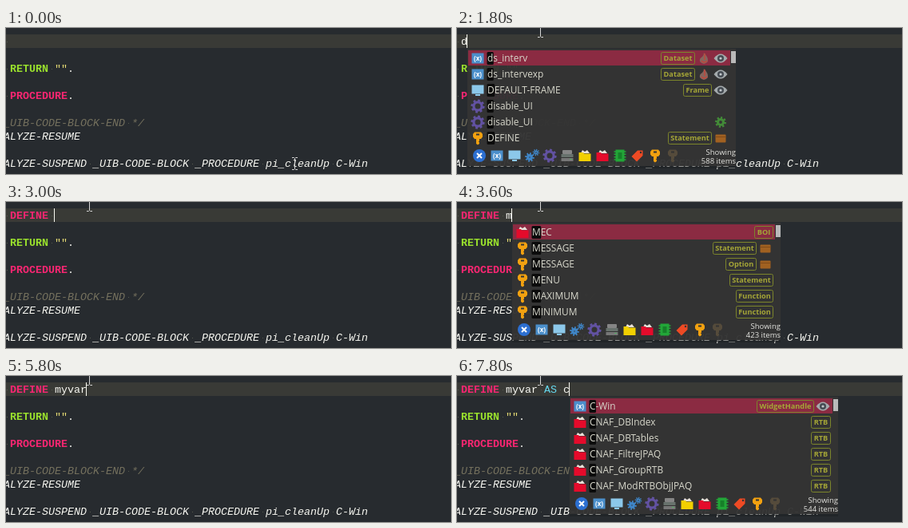
An HTML page for the animation above (8000 ms loop, 557 by 183 pixels).

```html
<!DOCTYPE html>
<html lang="en">
<head>
<meta charset="utf-8">
<title>Code completion</title>
<style>
  html, body { margin: 0; width: 100%; height: 100%; overflow: hidden; background: #272b2f; }
  svg { display: block; width: 557px; height: 183px; }
  text { white-space: pre; }
  .code { font: 13.333px "Liberation Mono", monospace; fill: #f8f8f2; }
  .key { fill: #f92672; font-weight: bold; }
  .ret { fill: #9be22d; font-weight: bold; }
  .str { fill: #e6db74; }
  .abbr { fill: #f0622d; }
  .as { fill: #66d9ef; }
  .note { fill: #75715e; font-style: italic; }
  .pre { font-style: italic; }
  .item { font: 11.9px "Open Sans", "Noto Sans", sans-serif; fill: #d8d8cc; }
  .badge { font: bold 9.2px "Open Sans", "Noto Sans", sans-serif; fill: #a5a637; text-anchor: middle; }
  .count { font: 9.5px "Open Sans", "Noto Sans", sans-serif; fill: #e4e4e0; text-anchor: end; }
  .glyph { font: bold 8px "Open Sans", sans-serif; fill: #fff; text-anchor: middle; }
</style>
</head>
<body>
<svg viewBox="0 0 557 183">
  <rect width="557" height="183" fill="#272b2f"/>
  <rect y="8" width="557" height="17" fill="#393a36"/>
  <g id="page"></g>
  <g id="typed"></g>
  <g id="popup"></g>
  <g id="mouse" fill="none" stroke="#d6d6d6">
    <path d="M-3.5-7.5H-1L0-6.5L1-7.5H3.5M0-6.5V6.5M-3.5 7.5H-1L0 6.5L1 7.5H3.5"/>
  </g>
</svg>
<script>
const LOOP = 8000, CHAR = 8, LEFT = 5, WIDTH = 336;
const $ = id => document.getElementById(id);
const pen = document.createElement('canvas').getContext('2d');
const measure = (s, font) => { pen.font = font; return pen.measureText(s).width; };
const ITEM_FONT = '11.9px "Open Sans", "Noto Sans", sans-serif';
const BADGE_FONT = 'bold 9.2px "Open Sans", "Noto Sans", sans-serif';

const rect = (x, y, w, h, fill, extra = '') =>
  `<rect x="${x}" y="${y}" width="${w}" height="${h}" fill="${fill}" ${extra}/>`;
const circle = (r, fill, extra = '') => `<circle r="${r}" fill="${fill}" ${extra}/>`;
const path = (d, fill, extra = '') => `<path d="${d}" fill="${fill}" ${extra}/>`;
const label = (x, y, cls, s) => `<text x="${x}" y="${y}" class="${cls}">${s}</text>`;

// One editor line made of [text, class] runs, with a faint dot on each blank.
function line(row, x, runs) {
  let out = '';
  for (const [s, cls] of runs) {
    out += label(x, 21 + row * 17, 'code ' + cls, s);
    [...s].forEach((c, i) => {
      if (c === ' ') out += rect(x + i * CHAR + 4, 17 + row * 17, 1, 1, '#55594f');
    });
    x += s.length * CHAR;
  }
  return out;
}

const gear = (c, r = 5) =>
  circle(r - 0.5, 'none', `stroke="${c}" stroke-width="3.2"`) +
  circle(r + 1.8, 'none', `stroke="${c}" stroke-width="2.4" pathLength="16" stroke-dasharray="1 1"`);
const folder = c =>
  path('M-5-3L-3-7L0-5L3-7L6-3Z', '#e8e0d8') +
  path('M-7.5-4H-2L-1-2.5H7.5V7H-7.5Z', c);
const key = c =>
  path('M-4-7.5H4L6-5V-1.5L4 1H2V3.5L1 4.5L2 5.5V7L0 8.5L-2 7V1H-4L-6-1.5V-5ZM-2-5.5V-3.5H2V-5.5Z', c, 'fill-rule="evenodd"');

const icons = {
  all: circle(8, '#2c6fd1') + path('M-3-3L3 3M3-3L-3 3', 'none', 'stroke="#fff" stroke-width="2"'),
  vars: rect(-7.5, -6.5, 15, 13, '#4b8fcb') + label(0, 3, 'glyph', '(x)'),
  frame: rect(-7.5, -6.5, 15, 11, '#8cc8ea') + rect(-3, 5, 6, 2, '#8cc8ea'),
  cogs: `<g transform="translate(-3 2)">${gear('#3f86c8', 2.8)}</g><g transform="translate(5 -4)">${gear('#3f86c8', 1.3)}</g>`,
  gear: gear('#6252a2', 5.6),
  cog: gear('#438a38', 4),
  db: rect(-6, -7, 12, 5, '#858585', 'rx="1"') + rect(-7.5, -2, 15, 4, '#68726d') +
      rect(-7.5, 3, 15, 4, '#777') + rect(3, 4, 3, 1, '#57ae67'),
  yellow: folder('#f2d000'),
  red: folder('#e50b2b'),
  chip: rect(-5.5, -7.5, 11, 15, '#23a638') +
      path('M-7.5-5H7.5M-7.5-1.7H7.5M-7.5 1.7H7.5M-7.5 5H7.5', 'none', 'stroke="#23a638" stroke-width="1.5"') +
      rect(-2.5, -4, 5, 8, '#168029'),
  tag: path('M-7.5 1L0-6.5H6.5V0L-1 7.5Z', '#ee4a24') + '<circle cx="4" cy="-4" r="1.2" fill="#333"/>',
  key: key('#f2a110'),
  dim: key('#554b3b'),
  eye: path('M-8.5 0Q0-11 8.5 0Q0 11-8.5 0Z', '#a4aaac') + circle(4, '#454b52') + circle(1.6, '#c3c8cc'),
  flame: path('M0-7Q6-1 5 4Q0 10-5 4Q-6 0-2-2Q0-4 0-7Z', '#85665e') +
      path('M1-6V2M-3 3Q0 7 4 3', 'none', 'stroke="#c0473c" stroke-width="1.5"'),
  hazard: [0, 120, 240].map(a =>
      `<circle cy="-3.5" r="3.4" fill="none" stroke="#387455" stroke-width="2" transform="rotate(${a})"/>`).join('') +
      circle(2, '#387455'),
  box: rect(-6.5, -4.5, 13, 10, '#a16121', 'rx="1"') + rect(-6.5, -2, 13, 1, '#804a18'),
};
const icon = (name, x, y) => `<g transform="translate(${x} ${y})">${icons[name]}</g>`;
const tools = ['all', 'vars', 'frame', 'cogs', 'gear', 'db', 'yellow', 'red', 'chip', 'tag', 'key', 'dim'];

// Each row: icon, name, badge, right-hand icons from the edge inwards.
const keys = rows => rows.split('|').map(r => ['key', ...r.split(',')]);
const lists = {
  d: [588, [['vars', 'ds_interv', 'Dataset', 'eye', 'flame'], ['vars', 'ds_intervexp', 'Dataset', 'eye', 'flame'],
    ['frame', 'DEFAULT-FRAME', 'Frame', 'eye'], ['gear', 'disable_UI', ''], ['gear', 'disable_UI', '', 'cog'],
    ['key', 'DEFINE', 'Statement', 'box']]],
  de: [96, [['frame', 'DEFAULT-FRAME', 'Frame', 'eye'],
    ...keys('DEFINE,Statement,box|DEFINED,Function|DEFINED,Preprocessor|DEFAULT,Option,box|DECIMAL,Function')]],
  def: [35, [['key', 'DEF', 'Abbreviation', 'hazard'], ['frame', 'DEFAULT-FRAME', 'Frame', 'eye'],
    ...keys('DEFINE,Statement,box|DEFINED,Function|DEFINED,Preprocessor|DEFAULT,Option,box')]],
  m: [423, [['red', 'MEC', 'BOI'],
    ...keys('MESSAGE,Statement,box|MESSAGE,Option,box|MENU,Statement|MAXIMUM,Function|MINIMUM,Function')]],
  my: [11, keys('EMPTY,Statement|EMPTY-SELECTION,Event|PRIMARY,Option|ASSEMBLY,Option|NO-EMPTY-SPACE,Option|GENERATE-RANDOM-KEY,Function')],
  a: [612, keys('AS,Option,box|ASSIGN,Statement,box|ABSOLUTE,Function|ACCUM,Function|ADD-FIRST,Option|ALERT-BOX,Option')],
  as: [194, keys('AS,Option,box|ASSIGN,Statement,box|ASSIGN,Option,box|ASC,Function|ASCENDING,Option,box|ASK-OVERWRITE,Option')],
  c: [544, [['vars', 'C-Win', 'WidgetHandle', 'eye'],
    ...['DBIndex', 'DBTables', 'FiltreJPAQ', 'GroupRTB', 'ModRTBObjJPAQ'].map(n => ['red', 'CNAF_' + n, 'RTB'])]],
};

// Dark boxes behind the letters that match the query in order.
function matches(name, query, x, y) {
  let from = 0, out = '';
  for (const c of query) {
    const i = name.toLowerCase().indexOf(c, from);
    const a = measure(name.slice(0, i), ITEM_FONT), b = measure(name.slice(0, i + 1), ITEM_FONT);
    out += rect(x + a - 0.5, y - 8, b - a + 1, 16, '#0b0b0b', 'rx="1.5"');
    from = i + 1;
  }
  return out;
}

function badge(s, right, y) {
  const w = Math.round(measure(s, BADGE_FONT) + 7);
  return rect(right - w + 0.5, y - 7.5, w - 1, 15, 'none', 'rx="2" stroke="#7c852b"') +
    label(right - w / 2, y + 3.3, 'badge', s);
}

function popup(query, x) {
  const [total, rows] = lists[query];
  let out = rect(x, 173, WIDTH, 3, '#1c1e20', 'opacity=".45"') +
    rect(x, 26, WIDTH, 147, '#333', 'opacity=".96"') +
    rect(x + 1, 28, 328, 19, '#8b2b42') +
    rect(x + 330, 29, 6, Math.max(15, Math.round(690 / total)), '#b9b9b9');
  rows.forEach(([kind, name, tag, ...marks], i) => {
    const y = 38 + i * 20;
    out += icon(kind, x + 13, y) + matches(name, query, x + 25, y) + label(x + 25, y + 4, 'item', name);
    if (tag) out += badge(tag, x + 327 - 21 * marks.length, y);
    marks.forEach((m, k) => { out += icon(m, x + 317 - 21 * k, y); });
  });
  tools.forEach((n, i) => { out += icon(n, x + 15 + 22 * i, 160); });
  return out + label(x + WIDTH, 159, 'count', 'Showing') + label(x + WIDTH, 170, 'count', total + ' items');
}

// Time, typed text, list query, list column, caret shown.
const steps = [
  [0, '', '', 0, 0], [400, '', '', 0, 1], [1000, '', '', 0, 0], [1400, '', '', 0, 1],
  [1800, 'd', 'd', 1, 1], [2200, 'de', 'de', 1, 1], [2600, 'def', 'def', 1, 1],
  [3000, 'DEFINE ', '', 0, 1], [3400, 'DEFINE m', '', 0, 1], [3600, 'DEFINE m', 'm', 8, 1],
  [4000, 'DEFINE my', 'm', 8, 1], [4200, 'DEFINE my', 'my', 8, 1],
  [4400, 'DEFINE my', 'my', 8, 0], [4800, 'DEFINE my', 'my', 8, 1],
  [5200, 'DEFINE myv', '', 0, 1], [5400, 'DEFINE myva', '', 0, 1],
  [5800, 'DEFINE myvar', '', 0, 1], [6200, 'DEFINE myvar ', '', 0, 1],
  [6600, 'DEFINE myvar a', 'a', 14, 1], [6800, 'DEFINE myvar as', 'as', 14, 1],
  [7200, 'DEFINE myvar AS ', '', 0, 1], [7800, 'DEFINE myvar AS c', 'c', 17, 1],
];
const classes = { DEFINE: 'key', def: 'abbr', as: 'as', AS: 'as' };

$('page').innerHTML =
  line(0, LEFT - CHAR, [[' ', '']]) +
  line(2, LEFT - CHAR, [[' ', ''], ['RETURN', 'ret'], [' ', ''], ['""', 'str'], ['.', '']]) +
  line(4, LEFT - CHAR, [[' ', ''], ['PROCEDURE', 'key'], ['.', '']]) +
  line(6, LEFT - CHAR, [['_UIB-CODE-BLOCK-END */', 'note']]) +
  line(7, LEFT - CHAR, [['ALYZE-RESUME', 'pre']]) +
  line(9, LEFT - CHAR, [['ALYZE-SUSPEND _UIB-CODE-BLOCK _PROCEDURE pi_cleanUp C-Win', 'pre']]);

let shown = null;
function draw(t) {
  const p = Math.min(1, Math.floor(t / 200) / 6), e = p * p * (3 - 2 * p);
  const mx = Math.round(361 - 257 * e), my = Math.round(170 - 166 * e);
  $('mouse').setAttribute('transform', `translate(${mx + 0.5} ${my})`);

  const step = steps.findLast(s => s[0] <= t);
  if (step === shown) return;
  shown = step;
  const [, text, query, col, caret] = step;
  const runs = (text.match(/\w+| /g) || []).map(w => [w, classes[w] || '']);
  $('typed').innerHTML = line(0, LEFT, runs) +
    (caret ? rect(LEFT - 1 + text.length * CHAR, 8, 1, 17, '#f8f8f0') : '');
  $('popup').innerHTML = query ? popup(query, LEFT + col * CHAR) : '';
}

const start = performance.now();
function tick() {
  draw((performance.now() - start) % LOOP);
  requestAnimationFrame(tick);
}
tick();
</script>
</body>
</html>
```
